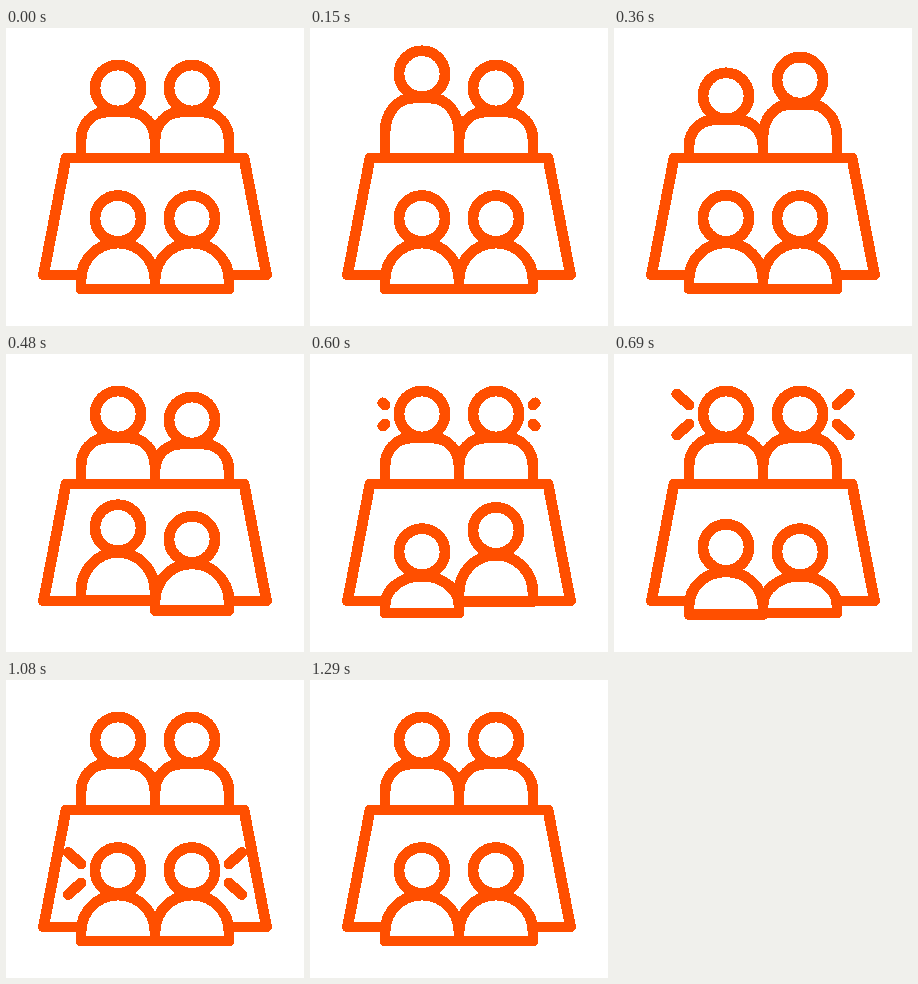
An HTML page that plays this animation: 298 px wide and 298 px high, repeating every 1.5 s.

```html
<!DOCTYPE html>
<html lang="en">
<head>
<meta charset="utf-8">
<title>Meeting table</title>
<style>
  html, body { margin: 0; width: 100%; height: 100%; overflow: hidden; background: #fff; }
  svg {
    display: block; width: 100vw; height: 100vh;
    fill: none; stroke: #ff4f00; stroke-width: 10.8; stroke-linecap: round; stroke-linejoin: round;
    shape-rendering: crispEdges;
  }

  /* A registered number keeps the hop on the paint path, so edges stay sharp. */
  @property --y { syntax: "<number>"; inherits: false; initial-value: 0; }

  .head { transform: translateY(calc(var(--y) * 1px)); animation: hop 1.5s var(--at) infinite; }
  .back { animation: back 1.5s var(--at) infinite; }
  .front { animation: front 1.5s var(--at) infinite; }
  .ray {
    stroke-dasharray: 1 2;
    opacity: 0;
    animation: ray 1.5s linear var(--at) infinite;
  }

  @keyframes hop {
    0%, 5.333% { --y: 0; animation-timing-function: cubic-bezier(.5, 0, .4, 1); }
    12.667% { --y: -17.2; animation-timing-function: cubic-bezier(.6, 0, .6, 1); }
    23.333% { --y: 8; animation-timing-function: ease-in-out; }
    31.333%, 100% { --y: 0; }
  }
  @keyframes back {
    0%, 5.333% {
      d: path("M-37 130V112C-37 96.5 -26 84 -11 84H11C26 84 37 96.5 37 112V130");
      animation-timing-function: cubic-bezier(.5, 0, .4, 1);
    }
    12.667% {
      d: path("M-37 130V103C-37 83 -25 67 -7 67H7C25 67 37 83 37 103V130");
      animation-timing-function: cubic-bezier(.6, 0, .6, 1);
    }
    23.333% {
      d: path("M-37 130V118C-37 103.5 -26 92 -11 92H11C26 92 37 103.5 37 118V130");
      animation-timing-function: ease-in-out;
    }
    31.333%, 100% {
      d: path("M-37 130V112C-37 96.5 -26 84 -11 84H11C26 84 37 96.5 37 112V130");
    }
  }
  @keyframes front {
    0%, 5.333% {
      d: path("M-37 261V252C-37 231.6 -20.4 215 0 215C20.4 215 37 231.6 37 252V261Z");
      animation-timing-function: cubic-bezier(.5, 0, .4, 1);
    }
    12.667% {
      d: path("M-37 246V237C-37 215.4 -20.4 198 0 198C20.4 198 37 215.4 37 237V246Z");
      animation-timing-function: cubic-bezier(.6, 0, .6, 1);
    }
    23.333% {
      d: path("M-37 259.5V252C-37 236 -20.4 223 0 223C20.4 223 37 236 37 252V259.5Z");
      animation-timing-function: ease-in-out;
    }
    31.333%, 100% {
      d: path("M-37 261V252C-37 231.6 -20.4 215 0 215C20.4 215 37 231.6 37 252V261Z");
    }
  }
  @keyframes ray {
    0% { opacity: 1; stroke-dashoffset: 1; }
    10% { opacity: 1; stroke-dashoffset: 0; }
    21% { opacity: 1; stroke-dashoffset: -1; }
    21.01%, 100% { opacity: 0; stroke-dashoffset: -1; }
  }
</style>
</head>
<body>
<svg viewBox="0 0 298 298">
  <!-- back row -->
  <g transform="translate(112 0)" style="--at: 0s">
    <circle class="head" cy="60" r="23"/>
    <path class="back" d="M-37 130V112C-37 96.5 -26 84 -11 84H11C26 84 37 96.5 37 112V130"/>
  </g>
  <g transform="translate(186 0)" style="--at: .09s">
    <circle class="head" cy="60" r="23"/>
    <path class="back" d="M-37 130V112C-37 96.5 -26 84 -11 84H11C26 84 37 96.5 37 112V130"/>
  </g>

  <!-- table -->
  <path d="M75 247H37.5L60 130H238L260.5 247H223"/>

  <!-- front row -->
  <g transform="translate(112 0)" style="--at: .27s">
    <circle class="head" cy="190.5" r="23"/>
    <path class="front" d="M-37 261V252C-37 231.6 -20.4 215 0 215C20.4 215 37 231.6 37 252V261Z"/>
  </g>
  <g transform="translate(186 0)" style="--at: .36s">
    <circle class="head" cy="190.5" r="23"/>
    <path class="front" d="M-37 261V252C-37 231.6 -20.4 215 0 215C20.4 215 37 231.6 37 252V261Z"/>
  </g>

  <!-- rays beside each row -->
  <g style="--at: .58s">
    <path class="ray" pathLength="1" d="M75 51L58.5 36"/>
    <path class="ray" pathLength="1" d="M75 70L58.5 85"/>
    <path class="ray" pathLength="1" d="M223 51L239.5 36"/>
    <path class="ray" pathLength="1" d="M223 70L239.5 85"/>
  </g>
  <g style="--at: .965s" transform="translate(0 133)">
    <path class="ray" pathLength="1" d="M75 51L58.5 36"/>
    <path class="ray" pathLength="1" d="M75 70L58.5 85"/>
    <path class="ray" pathLength="1" d="M223 51L239.5 36"/>
    <path class="ray" pathLength="1" d="M223 70L239.5 85"/>
  </g>
</svg>
</body>
</html>
```
